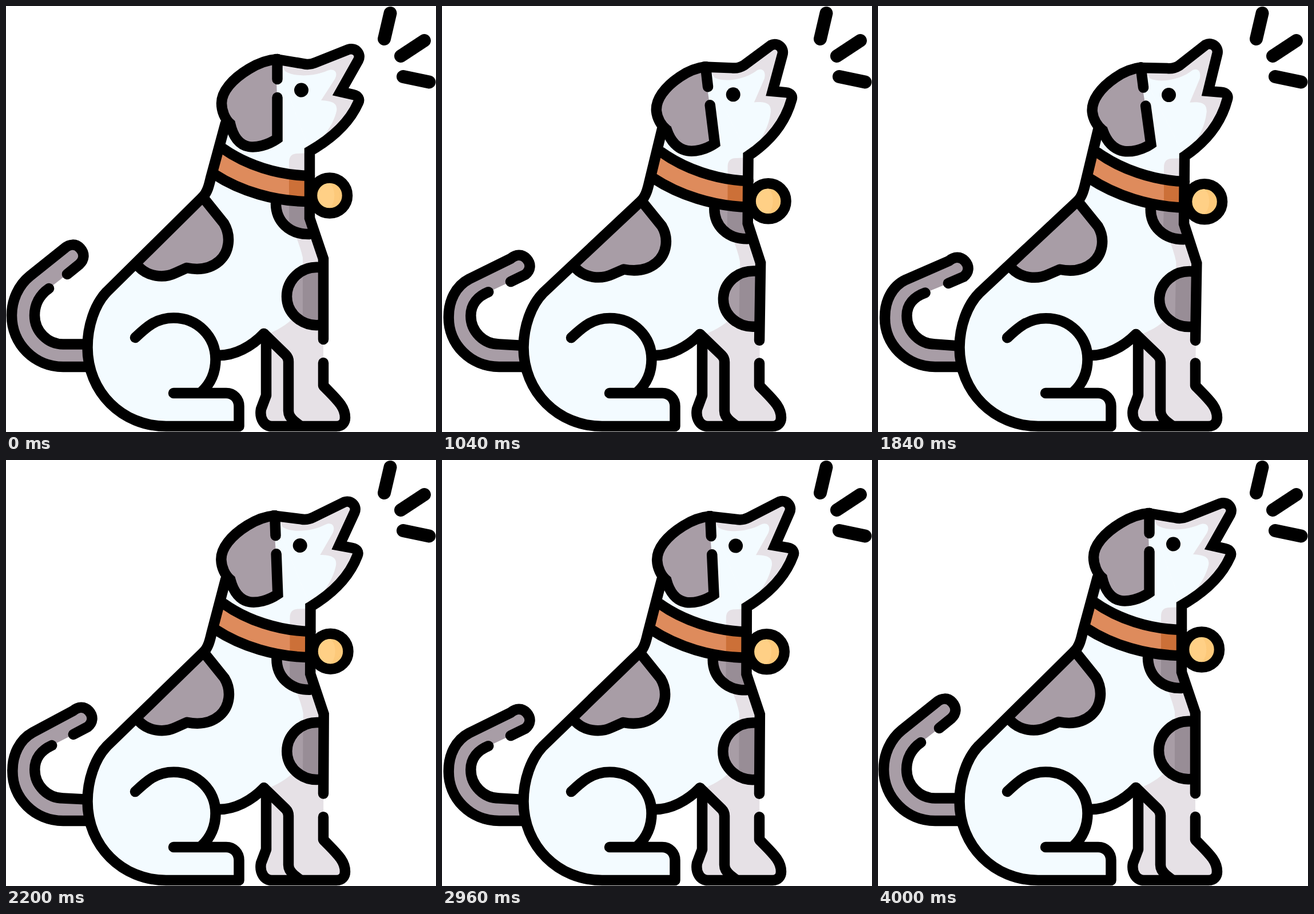
Write an HTML page that moves like this. It is 752 px wide and 745 px high and loops after 4040 ms.

```html
<!DOCTYPE html>
<html lang="en">
<head>
<meta charset="utf-8">
<title>Barking dog</title>
<style>
  html, body { margin: 0; width: 100%; height: 100%; overflow: hidden; background: #fff; }
  svg { display: block; width: 100vw; height: 100vh; }
</style>
</head>
<body>
<svg id="stage" viewBox="0 0 752 745"></svg>
<script>
const LOOP = 4040, STEP = 40, REST = 4000, BARK = 776, WAG = REST / 14;
const LIGHT = '#f3fbff', SHADE = '#e6e1e6', GREY = '#a89da6', DARK = '#988d96';
const stage = document.getElementById('stage');

// 0 at `from`, 1 at `to`, clamped outside.
const ramp = (v, from, to) => Math.min(1, Math.max(0, (v - from) / (to - from)));
const mix = (a, b, k) => a + (b - a) * k;

// Shift of a body point at full bark: the trunk sinks, the head tips back, the upper jaw opens.
function bodyShift(x, y) {
  const sink = ramp(y, 600, 335) ** 1.5;
  const chest = ramp(x, 400, 520) * Math.sin(Math.PI * ramp(y, 640, 200));
  const head = ramp(y, 250, 170);
  const jaw = ramp(x, 540, 600) * ramp(y, 150, 90);
  const tilt = mix(0.09, 0.125, ramp(x, 390, 470));
  const nod = 15 - 0.14 * Math.max(0, x - 470);
  return [
    5 * sink - tilt * Math.max(0, 250 - y) - 9 * jaw,
    mix(7 * sink + 4.5 * chest, nod, head) - 5 * jaw
  ];
}

// The tail bends more towards its tip.
function tailShift(x, y) {
  const bend = 21 * ramp(x - y, -470, -320) + 2 * ramp(y, 600, 540) * ramp(x, 60, 10);
  return [bend, bend];
}

const moving = [];

function add(tag, attrs) {
  const el = document.createElementNS('http://www.w3.org/2000/svg', tag);
  for (const key in attrs) el.setAttribute(key, attrs[key]);
  return stage.appendChild(el);
}

function path(d, attrs, shift = bodyShift) {
  const tokens = d.match(/[A-Z]|[\d.]+,[\d.]+/g).map(token => {
    if (!token.includes(',')) return token;
    const [x, y] = token.split(',').map(Number);
    return { x, y, shift: shift(x, y) };
  });
  moving.push({ el: add('path', attrs), tokens, isTail: shift === tailShift });
}

const ink = { stroke: '#000', 'stroke-width': 18.5 };
const fill = (d, color, shift) => path(d, { fill: color }, shift);
const line = (d, shift, join = 'round') => path(d, {
  ...ink, fill: 'none', 'stroke-linecap': 'round', 'stroke-linejoin': join
}, shift);

function disc(cx, cy, r, attrs) {
  moving.push({ el: add('circle', { cx, cy, r, ...attrs }), shift: bodyShift(cx, cy) });
}

// Bark strokes
add('path', {
  d: 'M672,12.5L661.5,57.5 M731.5,60.5L690.5,87.5 M694.5,123.5L740,133',
  stroke: '#000', 'stroke-width': 23, 'stroke-linecap': 'round'
});

// Tail
const tailOuter = 'M145,631 L100,631 C50,631 10,591 10,541 C10,514 22,488 42,472 L102,424 ' +
  'C111,416 122,415 130,424 C138,433 137,444 128,452 L107,469';
const tailInner = '75,494 C59,505 50,522 50,541 C50,569 73,591.5 100,591.5 L145,591.5';
fill(`${tailOuter} L${tailInner} Z`, GREY, tailShift);
line(tailOuter, tailShift);
line('M' + tailInner, tailShift);

// Shared contours
const back = '384,205 L358,301 C355,314 352,326 344,334 L176,500 C155,522 142.5,560 142.5,597 ' +
  'C142.5,675 203,735 280,735 L407.5,735 L407.5,700 C407.5,687 398,677 385,677';
const muzzle = 'L520,101 C528,103 534,102 541,99 L599,76 C611,72 622,84 616,95 L585,150 ' +
  'L607,155 C616,157 619,163 616,169 C601,203 573,230 531,254';
const belly = '370,611 C400,612 430,595 451,573';
const foreleg = 'L455,681 L446,705 C443,722 452,735 465,735 L578,735 C588,735 593,728 593,720 ' +
  'C593,700 578,688 555,664';
const ear = '475,93 C458,94 443,99 425,110 C395,128 377,150 377,170 C377,184 383,198 392,206 ' +
  'C397,228 408,243 425,246 C437,248 457,244 474.5,232';
const backPatch = 'M344,334 L381,380 C394,402 391,430 373,446 C357,460 336,462 316,458 ' +
  'L296,467 C275,477 248,473 232,456';
const neckPatch = 'M472,345 C472,376 495,400 531,399';
const chestPatch = 'M547,457 C515,455 491,480 491,508 C491,537 517,560 547,558';
const collarTop = 'M379,249 C420,278 475,296 531,297';

// Coat
fill(`M${back} L344,675 C358,660 367,640 ${belly} L555,570 L555,442 L531,371 L531,254 L472,93 Z`, LIGHT);
fill(`M472,93 ${muzzle} Z`, LIGHT);
fill(`M455,573 ${foreleg} L555,442 L531,371 L531,257 L510,258 C500,258 495,263 495,273 L495,365 ` +
  'C500,390 514,415 519,440 L520,510 C517,540 490,560 460,573 Z', SHADE);
fill(`M478,95 ${muzzle} C554,232 572,209 578,184 C580,172 574,166 551,165 ` +
  'L575,128 C582,115 573,108 562,113 C540,123 505,125 488,114 Z', SHADE);
fill(`M${ear} L474,160 L473,128 Z`, GREY);
fill(backPatch + ' Z', GREY);
fill(neckPatch + ' L531,345 Z', GREY);
fill('M495,345 L495,388 C505,396 517,400 531,399 L531,345 Z', DARK);
fill(chestPatch + ' L555,558 L555,457 Z', GREY);
fill('M555,457 L547,457 C537,456 527,459 519,463 L519,551 C528,556 537,559 547,558 L555,558 Z', DARK);

// Collar
fill(`${collarTop} L531,342 C470,342 410,324 364,294 Z`, '#de8b5c');
fill('M495,293 C507,296 519,297 531,297 L531,342 C519,342 507,341 495,338 Z', '#cc7038');

// Outlines
[neckPatch, chestPatch, backPatch, collarTop].forEach(d => line(d));
line('M364,294 C410,324 470,342 531,342');
line(`M${back} L293,677`);
line('M226,580 C245,562 262,545.5 293,545.5 C335,545.5 366.5,578 366.5,618 C366.5,640 358,660 342,675');
line(`M${belly}`);
line(`M455,582 ${foreleg} L555,624`);
line('M451,573 L489,610 C492,613 494,617 494,622 L494,708 C494,716 498,721 504,726 L514,734');
line(`M472,93 ${muzzle} L531,371 L555,442 L555,583`, bodyShift, 'miter');
line('M474.5,128 L474.5,93');
line(`M${ear} L474.5,160`, bodyShift, 'miter');

// Bell and eye
disc(566, 331.5, 31, { ...ink, fill: '#fdc97a' });
fill('M566,310 C538,310 538,353 566,353 C577,345 577,318 566,310 Z', '#ffd086');
disc(516.5, 147, 12.5, { fill: '#000' });

function draw(now) {
  const t = Math.floor((now % LOOP) / STEP) * STEP;
  const resting = t >= REST;
  const bark = resting ? 0 : 0.6 * (1 - Math.cos(2 * Math.PI * t / BARK));
  const wag = resting ? 0 : 1.2 * (1 - Math.abs(2 * (t / WAG % 1) - 1));
  for (const { el, tokens, isTail, shift } of moving) {
    if (tokens) {
      const k = isTail ? wag : bark;
      el.setAttribute('d', tokens.map(p => p.shift
        ? `${(p.x + k * p.shift[0]).toFixed(2)},${(p.y + k * p.shift[1]).toFixed(2)}` : p).join(' '));
    } else {
      el.setAttribute('transform', `translate(${bark * shift[0]} ${bark * shift[1]})`);
    }
  }
}

let start;
function tick(now) {
  start ??= now;
  draw(now - start);
  requestAnimationFrame(tick);
}
draw(0);
requestAnimationFrame(tick);
</script>
</body>
</html>
```
